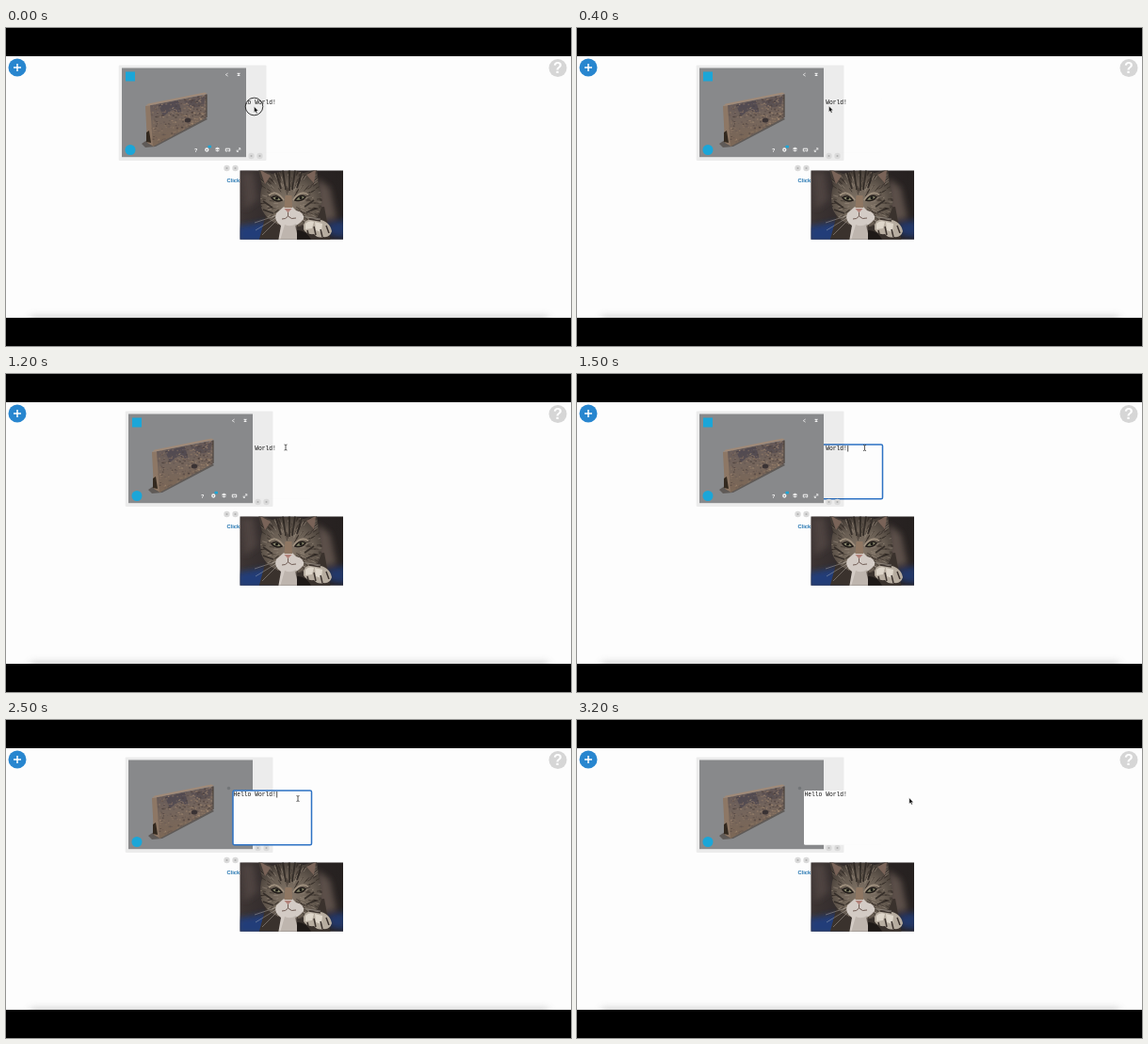
An HTML page that plays this animation: 600x338 px, repeating every 3.3 s.

```html
<!DOCTYPE html>
<html lang="en">
<head>
<meta charset="utf-8">
<title>Board</title>
<style>
  html, body { margin: 0; width: 100%; height: 100%; overflow: hidden; background: #000; }
  svg { display: block; width: 100vw; height: 100vh; }
  .sans { font-family: "Liberation Sans", Arial, sans-serif; font-weight: bold; }
  .mono { font: 6.3px "Liberation Mono", Courier, monospace; }
</style>
</head>
<body>
<svg viewBox="0 0 600 338">
  <defs>
    <filter id="soft" x="-10%" y="-300%" width="120%" height="700%"><feGaussianBlur stdDeviation="4"/></filter>
    <filter id="blur"><feGaussianBlur stdDeviation=".6"/></filter>
    <filter id="haze" x="-40%" y="-40%" width="180%" height="180%"><feGaussianBlur stdDeviation="3"/></filter>
    <clipPath id="page"><rect y="30" width="600" height="278"/></clipPath>
    <clipPath id="photo"><rect x="248.500" y="151.500" width="109.500" height="73.300"/></clipPath>
    <clipPath id="wall"><path d="M160 82L220 70.500 219.500 95.500 163 126Z"/></clipPath>
    <clipPath id="head"><path d="M268 150L283 155Q300 149 316 154L330 150 333 172Q339 185 331 201Q316 214 297 211Q277 207 271 191Q269 177 272 168Z"/></clipPath>
    <linearGradient id="stone" x1="0" y1="0" x2=".2" y2="1">
      <stop offset="0" stop-color="#5d5356"/><stop offset=".5" stop-color="#74655c"/><stop offset="1" stop-color="#7d6856"/>
    </linearGradient>
    <linearGradient id="room"><stop offset="0" stop-color="#3d3534"/><stop offset=".5" stop-color="#2b2525"/><stop offset="1" stop-color="#262120"/></linearGradient>
    <radialGradient id="coat" cx=".5" cy=".6" r=".6">
      <stop offset="0" stop-color="#85786a"/><stop offset=".6" stop-color="#695e53"/><stop offset="1" stop-color="#443c36"/>
    </radialGradient>
  </defs>

  <rect y="30" width="600" height="278" fill="#fdfdfd"/>
  <g clip-path="url(#page)"><rect x="26" y="307" width="550" height="10" fill="#777" opacity=".4" filter="url(#soft)"/></g>

  <circle cx="12" cy="42" r="9.500" fill="#2886cf"/>
  <path d="M8 42h8M12 38v8" stroke="#fff" stroke-width="1.500"/>
  <circle cx="586" cy="42.500" r="9.500" fill="#d6d6d6"/>
  <text class="sans" x="586" y="48.300" font-size="16" fill="#fff" text-anchor="middle">?</text>

  <g id="stack">
    <g id="note">
      <rect id="paper" x="241" y="75" width="83.500" height="57.700" rx="1.500" fill="#fdfdfd"/>
      <circle id="noteGrip" cx="236.500" cy="72.500" r="1.700" fill="#727577"/>
      <text class="mono" x="241.500" y="81.200" fill="#111">Hello World!</text>
      <path id="caret" d="M287.700 76v6.500" stroke="#222" stroke-width=".8"/>
    </g>
    <g id="viewer">
      <rect x="126.700" y="39.500" width="156.800" height="101.500" rx="1" fill="#000" fill-opacity=".065"/>
      <rect x="130" y="42.500" width="132" height="94.700" fill="#88898b"/>
      <g filter="url(#blur)">
        <path d="M151 123L157 119 219 95 221 97 166 126 155 127Z" fill="#5f5a57"/>
        <path d="M155 83L161 82 164 126 157 122Z" fill="#8d7765"/>
        <path d="M156 111L159 109 161 122 156 121Z" fill="#33291f"/>
        <path d="M160 82L220 70.500 219.500 95.500 163 126Z" fill="url(#stone)"/>
        <path d="M169 82L190 77 194 91 183 87 174 94Z" fill="#3f3c4b" opacity=".55"/>
        <path d="M196 78L218 73 217 83 203 85Z" fill="#423d45" opacity=".4"/>
        <g id="stones" clip-path="url(#wall)"></g>
        <ellipse cx="200" cy="98" rx="3.200" ry="2.500" fill="#3a3334"/>
        <path d="M155 83L158 80.500 218 68.500 221 70 161 82Z" fill="#a08a78"/>
        <path d="M220 70.500V95" stroke="#40362f" stroke-width="1"/>
      </g>
      <circle cx="139" cy="129.500" r="5.500" fill="#1ba6d8"/>
      <g id="tools" fill="none" stroke="#f4f4f4" stroke-width=".8">
        <rect x="134" y="46.500" width="10" height="10" fill="#1ba6d8" stroke="none"/>
        <path d="M242.700 48L240.200 49.600l2.500 1.600" stroke-width=".7"/>
        <path d="M252.700 47.800l2.700 2.700m0-2.700l-2.700 2.700" stroke-width="1.100"/>
        <text class="sans" x="208.700" y="131.500" font-size="5.500" fill="#fff" stroke="none" text-anchor="middle">?</text>
        <circle cx="220.300" cy="129.500" r="1.500" stroke-width="1.300"/>
        <rect x="221.500" y="124.700" width="3.500" height="2.800" rx=".8" fill="#1ba6d8" stroke="none"/>
        <path d="M229.500 128.200l2-1 2 1-2 1zM229.500 130l2 1 2-1" fill="#f4f4f4"/>
        <path d="M240.300 128.200h4.400v2.700h-1.300l-.9-.9-.9.900h-1.300z" stroke-width="1"/>
        <path d="M252.200 131.400l3.600-3.600m-1.800 0h1.800v1.800m-3.600 0v1.800h1.800"/>
      </g>
      <g id="panelGrips"></g>
    </g>
  </g>

  <g id="linkGrips"></g>
  <text class="sans" x="234.500" y="164" font-size="5.700" fill="#1b70ae">Click</text>

  <g clip-path="url(#photo)">
    <rect x="248" y="151" width="111" height="75" fill="url(#room)"/>
    <g filter="url(#haze)">
      <path d="M246 211L276 206 286 228H246Z" fill="#223e79"/>
      <path d="M341 207L361 204V223L345 221Z" fill="#22396a"/>
      <path d="M249 153h14l4 30-14 10z" fill="#4e433f"/>
      <path d="M331 160L344 170 351 202 331 207Z" fill="#5c5048"/>
    </g>
    <g filter="url(#blur)">
      <path d="M277 195L268 228H345L338 190Z" fill="#3a322d"/>
      <path d="M268 150L283 155Q300 149 316 154L330 150 333 172Q339 185 331 201Q316 214 297 211Q277 207 271 191Q269 177 272 168Z" fill="url(#coat)"/>
      <g id="fur" clip-path="url(#head)"></g>
      <path d="M270 151L281 157 275 166Z" fill="#796358"/>
      <path d="M329 151L319 156 327 165Z" fill="#796358"/>
      <path d="M294 151L297 172M301 150L301 173M307 151L304 172M287 154L292 171M314 154L309 170M273 184L283 191M327 183L317 190M273 193L284 197M329 192L319 196" stroke="#2a2420" stroke-width="1.800" opacity=".8" fill="none"/>
      <path d="M279 178Q287 171 295 183M305 183Q312 172 321 177" stroke="#a0917f" stroke-width="1.800" fill="none"/>
      <path d="M295 190H304L308 194Q317 196 316 203Q311 209 307 210L311 227H289L292 210Q284 205 287 197Z" fill="#d3cbc5"/>
      <path d="M296.500 178L303.500 178 304 191 295.500 191Z" fill="#8f7763"/>
      <path d="M295.500 192h8l-4 4.300z" fill="#b08078"/>
      <path d="M299.500 196v4M293 203Q297 203.500 299.500 200Q303 204 308 202" stroke="#655048" stroke-width=".9" fill="none"/>
      <path d="M296 209Q302 212 308 208L310 226H291Z" fill="#aaa098" opacity=".5"/>
      <path d="M282 180.500Q287 176 293 183Q287 186 282 180.500ZM307 183Q312 176 318 179.500Q314 185 307 183Z" fill="#85856a" stroke="#211c19" stroke-width="1.400"/>
      <circle cx="287.500" cy="181" r="1.500" fill="#151311"/><circle cx="313" cy="180.500" r="1.500" fill="#151311"/>
      <path d="M288 199L264 207M288 201L265 215M289 203L272 220M312 200L334 203M311 202L326 209" stroke="#e5dfd8" stroke-width=".5" opacity=".65"/>
      <path d="M316 209Q318 202 330 203Q344 205 346 216Q344 223 337 222Q331 224 327 219Q319 220 316 214Z" fill="#b7ada0"/>
      <path d="M318 208Q322 204 327 206L325 213 318 214ZM328 206L336 208 335 217 329 215Z" fill="#ded6ca"/>
      <path d="M320 215l1 4M327 211l2 9M334 214l2 8M340 210l3 8M322 203l12 2" stroke="#3c332e" stroke-width="1.500"/>
      <path d="M309 215Q318 214 325 226H309Z" fill="#1e1917"/>
    </g>
  </g>

  <g id="pointer">
    <circle id="ring" r="9.300" fill="none" stroke="#222" stroke-width=".9"/>
    <path id="arrow" d="M0 0V6.200L1.400 5 2.400 7.200 3.500 6.700 2.500 4.600H4.400Z" fill="#111" stroke="#fff" stroke-width=".35"/>
    <path id="beam" d="M-1.500-3Q0-3 0-2Q0-3 1.500-3M0-2V2M-1.500 3Q0 3 0 2Q0 3 1.500 3" fill="none" stroke="#333" stroke-width=".8"/>
  </g>
</svg>
<script>
  const LOOP = 3300, STEP = 100;
  const $ = id => document.getElementById(id);

  function make(parent, tag, attrs) {
    const el = document.createElementNS('http://www.w3.org/2000/svg', tag);
    for (const key in attrs) el.setAttribute(key, attrs[key]);
    parent.append(el);
  }

  let seed = 7;
  const random = () => (seed = seed * 16807 % 2147483647) / 2147483647;

  function grips(parent, x, y) {
    for (const cx of [x, x + 9]) {
      make(parent, 'circle', { cx, cy: y, r: 3.2, fill: '#dadada' });
      make(parent, 'circle', { cx, cy: y, r: 1, fill: '#b0b0b0' });
    }
  }

  const stoneColors = ['#a58d76', '#483d3a', '#927b66', '#615450'];
  for (let i = 0; i < 320; i++) {
    const u = random();
    const x = 160 + 60 * u;
    const y = 82 - 12 * u + random() * (44 - 18 * u);
    make($('stones'), 'rect', {
      x, y, width: 0.8 + random() * 1.6, height: 0.6 + random(),
      fill: stoneColors[i % 4], opacity: 0.6
    });
  }

  // Fur strokes fan out from the nose.
  for (let i = 0; i < 260; i++) {
    const angle = random() * Math.PI * 2, r = 9 + random() * 30;
    const dx = Math.cos(angle), dy = Math.sin(angle);
    const x = 300 + dx * r, y = 186 + dy * r;
    make($('fur'), 'path', {
      d: `M${x} ${y}l${dx * 5} ${dy * 5}`,
      stroke: i % 5 < 3 ? '#29221e' : '#a09284', 'stroke-width': 0.9, opacity: 0.6
    });
  }

  grips($('panelGrips'), 267.5, 136);
  grips($('linkGrips'), 234.5, 149);

  // time, x, y
  const pointerPath = [
    [0, 263.5, 83.5], [300, 267.3, 83], [600, 268, 83], [900, 284, 77.5],
    [1200, 297, 78], [1500, 305.5, 78.5], [1900, 309.5, 83.5], [2500, 310, 83.5],
    [2700, 310, 83.5], [3000, 352, 83], [3300, 353.2, 82.7]
  ];
  const panelPath = [[0, -7], [200, 0], [LOOP, 0]];

  function sample(keys, t) {
    const i = Math.max(1, keys.findIndex(k => k[0] > t));
    const a = keys[i - 1], b = keys[i];
    const p = (t - a[0]) / (b[0] - a[0]);
    return a.slice(1).map((v, n) => v + (b[n + 1] - v) * p);
  }

  const show = (id, on) => $(id).setAttribute('visibility', on ? 'visible' : 'hidden');
  const move = (id, x, y) => $(id).setAttribute('transform', `translate(${x} ${y})`);

  function draw(t) {
    const [x, y] = sample(pointerPath, t);
    const focused = t >= 1300 && t < 3000;
    const raised = t >= 1900;
    const overText = x > 275 && x < 325;

    move('viewer', sample(panelPath, t)[0], 0);
    move('pointer', x, y);
    show('ring', t < 200);
    show('arrow', !overText);
    show('beam', overText);
    show('caret', focused && Math.floor((t - 1300) / 500) % 2 === 0);
    show('noteGrip', raised);
    show('tools', t < 2400);

    $('paper').setAttribute('stroke', focused ? '#2d72c4' : 'none');
    $('paper').setAttribute('stroke-width', 1.5);
    const top = raised ? 'note' : 'viewer';
    if ($('stack').lastElementChild.id !== top) $('stack').append($(top));
  }

  function tick() {
    const t = performance.now() % LOOP;
    draw(Math.floor(t / STEP) * STEP);
    requestAnimationFrame(tick);
  }
  tick();
</script>
</body>
</html>
```
